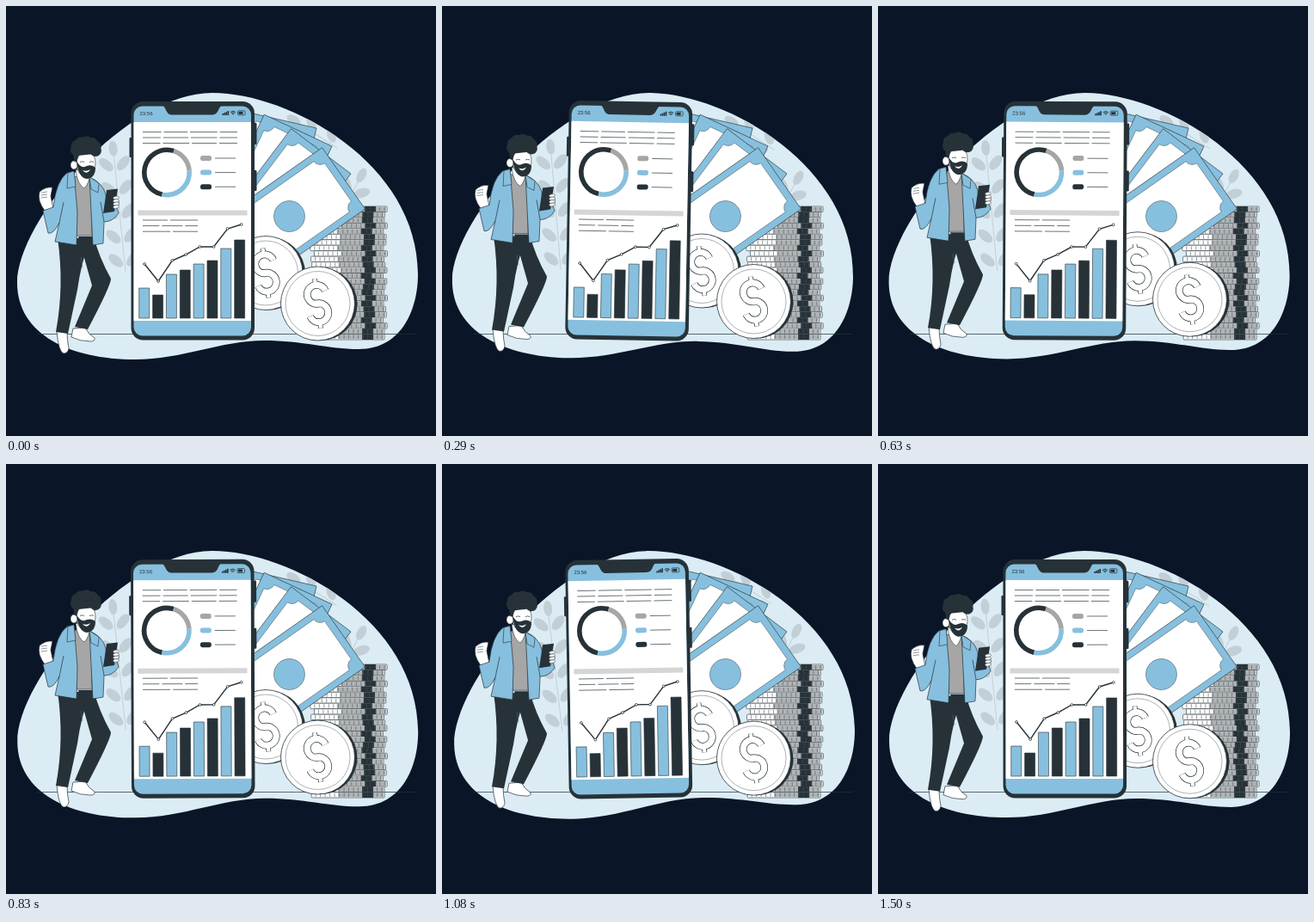
Write an HTML page with a canvas that moves like this. It is 500 by 500 pixels and loops after 1540 ms.

```html
<!DOCTYPE html>
<html lang="en">
<head>
<meta charset="utf-8">
<title>Finance dashboard</title>
<style>
html, body { margin: 0; width: 100%; height: 100%; overflow: hidden; background: #0a1527; }
canvas { display: block; width: 100vw; height: 100vh; }
</style>
</head>
<body>
<canvas id="stage" width="500" height="500"></canvas>
<script>
const ctx = document.getElementById('stage').getContext('2d');
const { PI, sin, cos } = Math;
const LOOP = 1540, RIGHT_PEAK = 300, LEFT_PEAK = 1080;
const BG = '#0a1527', PALE = '#dbecf5', BLUE = '#87c0de', DARK = '#263238';
const GREY = '#a6a6a6', SILVER = '#d5d5d5', WHITE = '#fff', LEAF = '#c3cfd6', RULE = '#59646a';

const easeIn = p => p ** 1.3;
const easeOut = p => 1 - (1 - p) ** 1.4;

// Rock right, then left, then settle; one degree each way
function tiltAt(t) {
  const share = t < RIGHT_PEAK ? easeOut(t / RIGHT_PEAK)
    : t < LEFT_PEAK ? 1 - 2 * easeIn((t - RIGHT_PEAK) / (LEFT_PEAK - RIGHT_PEAK))
    : easeOut((t - LEFT_PEAK) / (LOOP - LEFT_PEAK)) - 1;
  return share * PI / 180;
}

const liftAt = t => -5 * sin(PI * t / LOOP) ** 1.2;

function paint(fill, stroke, width = .7) {
  if (fill) { ctx.fillStyle = fill; ctx.fill(); }
  if (stroke) { ctx.strokeStyle = stroke; ctx.lineWidth = width; ctx.stroke(); }
}

function group(x, y, angle, draw) {
  ctx.save();
  ctx.translate(x, y);
  ctx.rotate(angle);
  draw();
  ctx.restore();
}

function shape(path, fill, stroke, width) {
  const p = new Path2D(path);
  if (fill) { ctx.fillStyle = fill; ctx.fill(p); }
  if (stroke) { ctx.strokeStyle = stroke; ctx.lineWidth = width || .7; ctx.stroke(p); }
}

function oval(x, y, rx, ry, angle, fill, stroke, width) {
  ctx.beginPath();
  ctx.ellipse(x, y, rx, ry, angle, 0, 2 * PI);
  paint(fill, stroke, width);
}

const disc = (x, y, r, ...style) => oval(x, y, r, r, 0, ...style);

function box(x, y, w, h, r, fill, stroke, width) {
  ctx.beginPath();
  ctx.roundRect(x, y, w, h, r);
  paint(fill, stroke, width);
}

function line(x1, y1, x2, y2, color = DARK, width = .7) {
  ctx.beginPath();
  ctx.moveTo(x1, y1);
  ctx.lineTo(x2, y2);
  paint(null, color, width);
}

function sprig(x, y, angle, pairs) {
  group(x, y, angle, () => {
    line(0, 0, 0, -pairs * 28, LEAF, 1);
    for (let i = 0; i < pairs; i++)
      for (const side of [-1, 1])
        oval(side * 10, -14 - i * 28, 10, 5.5, side * -.8, LEAF);
    oval(0, -pairs * 28 - 4, 5, 9, 0, LEAF);
  });
}

function backdrop(angle) {
  const blob = new Path2D('M13 322 C13 250 140 101 240 101 C330 101 479 183 479 312 ' +
    'C479 350 462 399 410 399 C375 399 345 389 300 389 C250 389 205 411 150 411 C75 411 13 382 13 322');
  group(247, 256, angle, () => {
    ctx.translate(-247, -256);
    ctx.fillStyle = PALE;
    ctx.fill(blob);
    ctx.clip(blob);
    sprig(139, 309, -.1, 5);
    sprig(385, 165, -1, 2);
    sprig(398, 225, .5, 1);
  });
}

function coinStack() {
  const rows = 24, h = 155 / rows;
  for (let i = 0; i < rows; i++) {
    group(356 + 2.5 * sin(i * 2.4 + 1), 233 + i * h, 0, () => {
      box(0, 0, 85, h, 1, WHITE, DARK, .6);
      ctx.fillStyle = '#b0b3b5';
      ctx.fillRect(31, .5, 53, h - 1);
      ctx.fillStyle = DARK;
      ctx.fillRect(59, 0, 13, h);
      for (let x = 5; x < 85; x += 5.5) line(x, 1, x, h - 1, '#4b5559', .6);
    });
  }
}

// A banknote placed by its lower right corner
function bill(x, y, degrees) {
  group(x, y, degrees * PI / 180, () => {
    ctx.translate(-77, -43.5);
    box(-77, -43.5, 154, 87, 0, BLUE, DARK, .6);
    ctx.beginPath();
    for (let i = 0; i < 4; i++) {
      const sx = i % 3 ? 1 : -1, sy = i < 2 ? -1 : 1;
      const start = (i + 1) * PI / 2;
      ctx.arc(sx * 69, sy * 36, 9, start, start - PI / 2, true);
    }
    ctx.closePath();
    paint(WHITE, DARK, .4);
    disc(0, 0, 18, BLUE, DARK, .4);
  });
}

function dollar(color, width) {
  ctx.beginPath();
  ctx.moveTo(0, -29);
  ctx.lineTo(0, -22);
  ctx.moveTo(0, 22);
  ctx.lineTo(0, 29);
  paint(null, color, width - 3);
  ctx.beginPath();
  ctx.arc(0, -10.7, 11, -.3, PI / 2, true);
  ctx.arc(0, 10.7, 11, -PI / 2, PI - .3);
  paint(null, color, width);
}

function coin(x, y) {
  disc(x + 3.5, y + .5, 42.5, DARK);
  disc(x, y, 43, WHITE, DARK, .8);
  disc(x, y, 37.5, null, RULE, .5);
  group(x, y, -.12, () => {
    dollar(DARK, 8.6);
    dollar(WHITE, 7.2);
  });
}

// A row of dashes with uneven lengths
function dashes(x1, x2, y, count) {
  const step = (x2 - x1) / count;
  const cut = i => x1 + i * step + (i % count ? 5 * sin(i * 2 + y) : 0);
  for (let i = 0; i < count; i++) line(cut(i), y, cut(i + 1) - 3, y, RULE, .9);
}

function statusBar() {
  ctx.fillStyle = DARK;
  ctx.font = '6px "Liberation Sans", sans-serif';
  ctx.fillText('23:56', 155.5, 127);
  for (let i = 0; i < 4; i++) ctx.fillRect(251.5 + i * 2, 125 - i, 1.6, 2 + i);
  for (let r = 1.5; r < 5; r += 1.6) {
    ctx.beginPath();
    ctx.arc(264, 127, r, -2.3, -.84);
    paint(null, DARK, .9);
  }
  box(269.5, 121.8, 8.5, 5, 1, null, DARK, .7);
  ctx.fillStyle = DARK;
  ctx.fillRect(270.5, 122.8, 5, 3);
}

function donut() {
  const arc = (from, to, color) => {
    ctx.beginPath();
    ctx.arc(187, 193.5, 26.2, from * PI / 180, to * PI / 180);
    paint(null, color, 5.6);
  };
  arc(102, 288, DARK);
  arc(-72, -4, GREY);
  arc(-4, 102, BLUE);
}

function charts() {
  [35, 27, 51, 56, 63, 67, 81, 91].forEach((h, i) =>
    box(154.7 + i * 15.85, 363 - h, 12, h, 0, i % 2 ? DARK : BLUE, DARK, .6));
  const trend = [300, 320, 296, 289, 280, 280, 259, 254].map((y, i) => [161 + i * 16.1, y]);
  ctx.beginPath();
  trend.forEach(p => ctx.lineTo(...p));
  paint(null, DARK, 1.4);
  trend.forEach(([x, y]) => disc(x, y, 1.4, WHITE, DARK, .8));
}

function phone(angle) {
  group(217, 250, angle, () => {
    ctx.translate(-217, -250);
    box(143.5, 153, 4, 23, 1, DARK);
    box(288, 136, 3.5, 25, 1, DARK);
    box(288, 191, 3.5, 24, 1, DARK);
    box(145.5, 111, 143.5, 277.5, 14, DARK);
    box(148.5, 116.5, 136.5, 267, 10, BLUE);
    ctx.fillStyle = WHITE;
    ctx.fillRect(148.5, 135, 136.5, 231);
    shape('M181 115 Q184 116 186 121 T192 126.5 H240 Q245 126 247 121 T252 115', DARK);
    statusBar();
    for (let i = 0; i < 3; i++) {
      dashes(159, 272, 146.5 + i * 6.5, 4);
      dashes(159, 226, 249 + i * 6.6, 2 + i % 2);
    }
    donut();
    [GREY, BLUE, DARK].forEach((color, i) => {
      const y = 174 + i * 16.6;
      box(226, y, 13, 6, 2.5, color);
      line(243, y + 3, 267, y + 3, RULE, .9);
    });
    ctx.fillStyle = SILVER;
    ctx.fillRect(153.5, 237.5, 127, 6);
    charts();
  });
}

function legs() {
  shape('M59 378 H71 Q71 389 73 398 Q72 404 67 404 Q61 402 59 378', WHITE, DARK);
  shape('M78 375 L92 374 Q96 382 103 386 Q104 390 98 390 Q86 390 76 385 Z', WHITE, DARK);
  shape('M60 270 H98 Q87 300 83 330 L72 381 L58 379 Q68 325 60 270', DARK);
  shape('M84 268 H102 Q108 292 122 317 Q122 325 95 376 L80 373 L100 325 Z', DARK);
  line(87, 292, 89, 304, RULE, .6);
}

function torso() {
  shape('M79 198 L99 203 L100 267 H82 Z', GREY, DARK, .6);
  shape('M81 190 L98 194 Q97 206 91 212 Q83 208 81 190', WHITE, DARK, .6);
  shape('M39 216 Q46 210 54 211 L52 221 L55 236 L45 238 Q36 226 39 216', WHITE, DARK);
  for (let i = 0; i < 3; i++) line(41, 217 + i * 3, 48, 216 + i * 3, DARK, .5);
  shape('M79 192 L71 194 Q58 204 55 234 L43 238 L49 264 Q55 266 62 252 L57 274 L82 278 L83 240 Z', BLUE, DARK);
  shape('M79 192 L72 194 L71 212 L81 210 Z', BLUE, DARK, .6);
  line(62, 252, 67, 228);
  shape('M97 199 Q112 205 116 219 L118 238 L129 234 L131 241 Q124 251 114 251 L113 276 L101 278 Z', BLUE, DARK);
  shape('M97 199 L108 206 L107 217 L99 213 Z', BLUE, DARK, .6);
  line(114, 251, 110, 228);
  oval(125, 230, 6, 8, .3, WHITE, DARK, .6);
  shape('M117 214 L130 212.5 L126 239 L113 241 Z', DARK);
  for (let i = 0; i < 4; i++) oval(128, 223 + i * 3.5, 3.5, 1.8, -.15, WHITE, DARK, .5);
}

function head() {
  oval(93, 183, 11, 15, .1, WHITE, DARK, .6);
  oval(79, 185, 4, 5, 0, WHITE, DARK, .6);
  shape('M82 180 Q87 190 94 186 Q100 184 104 188 Q104 200 94 201 Q84 200 82 180', DARK);
  shape('M89 191 Q94 193 98 190 Q94 197 89 191', WHITE);
  for (const x of [86, 97]) shape(`M${x} 181.5 q2.5 -1.5 5 0`, null, DARK);
  for (let i = 0; i < 7; i++) {
    const a = PI * (.95 + i * .19);
    disc(93 + 11.5 * cos(a), 166 + 8 * sin(a), 6.8, DARK);
  }
  shape('M76 164 L80 182 L84 174 L103 172 L108 165 Z', DARK);
}

function man() {
  legs();
  torso();
  head();
}

function draw(t) {
  const lift = liftAt(t), angle = tiltAt(t);
  ctx.fillStyle = BG;
  ctx.fillRect(0, 0, 500, 500);
  backdrop(angle);
  line(36, 381.5, 477, 381.5);
  coinStack();
  bill(361, 142, -77);
  bill(379, 163, -65);
  bill(401, 195, -53);
  bill(417.5, 236, -35);
  group(0, lift, 0, () => {
    coin(302, 310.5);
    coin(362.5, 346);
  });
  phone(angle);
  group(0, lift, 0, man);
}

// The picture advances 24 times a second, on 10 ms ticks
function frame(now) {
  const tick = Math.floor(now % LOOP / 10);
  const step = Math.max(Math.ceil((tick + .5) * .24) - 1, 0);
  draw(step * 1000 / 24);
  requestAnimationFrame(frame);
}
requestAnimationFrame(frame);
</script>
</body>
</html>
```
